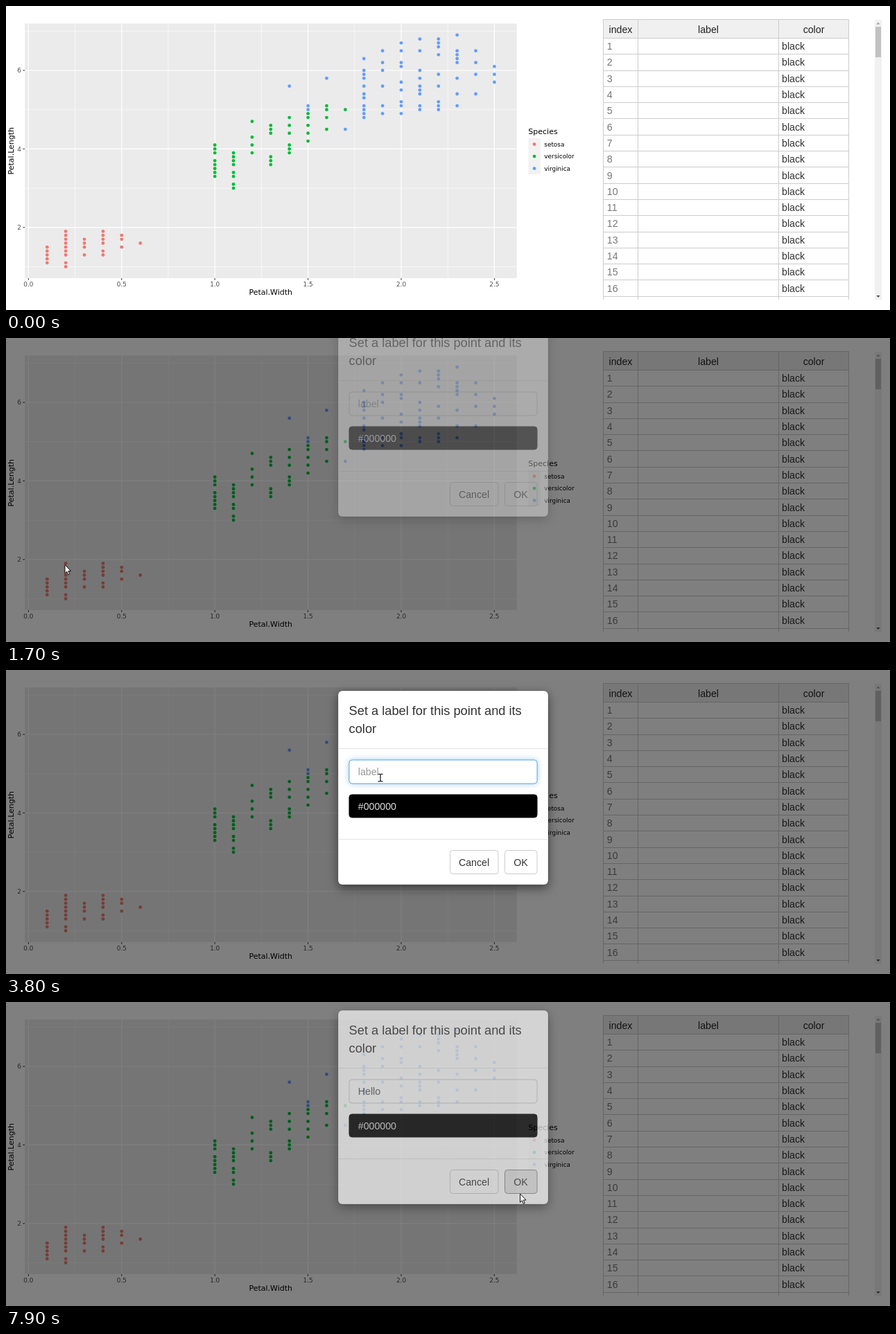
Write an HTML page that moves like this. It is 1275 px wide and 439 px high and loops after 8 s.

```html
<!DOCTYPE html>
<html lang="en">
<head>
<meta charset="utf-8">
<title>Label a point</title>
<style>
  html, body { margin: 0; width: 100%; height: 100%; overflow: hidden; background: #fff; }
  svg { display: block; width: 100%; height: 100%; font-family: "Liberation Sans", Arial, sans-serif; font-size: 14.18px; }
  text { white-space: pre; }
  .plot { font-family: "DejaVu Sans", Verdana, sans-serif; font-size: 8.9px; }
  .title { font-size: 11px; }
  .heading { font-size: 18.23px; }
  .sheet { filter: drop-shadow(0 5px 7.5px rgba(0,0,0,.5)); }
  .glow { filter: drop-shadow(0 0 4px rgba(102,175,233,.6)); }
</style>
</head>
<body>
<svg id="stage" viewBox="0 0 1275 439"></svg>
<script>
const LOOP = 8000, STEP = 100;

const ramp = (t, start, length) => Math.min(1, Math.max(0, (t - start) / length));
const easeOut = p => 1 - (1 - p) ** 1.6;
const mix = (a, b, p) => a + (b - a) * p;

// outline: [petal width, shortest, longest petal] in tenths; density: share of the inside that is filled
const species = [
  { name: "setosa", color: "#F8766D", density: .7,
    outline: [[1, 11, 15], [2, 10, 19], [3, 13, 17], [4, 13, 19], [6, 16, 16]] },
  { name: "versicolor", color: "#00BA38", density: .65,
    outline: [[10, 33, 41], [11, 30, 39], [12, 39, 47], [13, 36, 46], [16, 45, 51], [17, 50, 50]] },
  { name: "virginica", color: "#619CFF", density: .38,
    outline: [[14, 56, 56], [15, 50, 51], [16, 58, 58], [17, 45, 45], [18, 48, 63], [20, 49, 67], [23, 51, 69], [25, 57, 61]] }
];

let seed = 11;
const random = () => (seed = seed * 16807 % 2147483647) / 2147483647;

function cloud({ outline, density }) {
  const points = [];
  const column = (w, low, high) => {
    for (let l = low; l <= high; l++)
      if (l === low || l === high || random() < density) points.push([w / 10, l / 10]);
  };
  outline.forEach(([w, low, high], i) => {
    const [nextW, nextLow, nextHigh] = outline[i + 1] || [w + 1, low, high];
    for (let v = w; v < nextW; v++) {
      const p = (v - w) / (nextW - w);
      column(v, Math.round(mix(low, nextLow, p)), Math.round(mix(high, nextHigh, p)));
    }
  });
  return points;
}

const px = v => 32.4 + 268.8 * v;
const py = v => 433.2 - 56.7 * v;
const rect = (x, y, w, h, fill, more = "") =>
  `<rect x="${x}" y="${y}" width="${w}" height="${h}" fill="${fill}" ${more}/>`;
const line = (x1, y1, x2, y2, color, width = 1) =>
  `<path d="M${x1} ${y1}L${x2} ${y2}" stroke="${color}" stroke-width="${width}"/>`;
const text = (x, y, s, fill, more = "") => `<text x="${x}" y="${y}" fill="${fill}" ${more}>${s}</text>`;
const dot = (x, y, fill) => `<circle cx="${x}" cy="${y}" r="2.4" fill="${fill}"/>`;
const middle = 'text-anchor="middle"';

function plot() {
  const vertical = (v, w) => line(px(v), 25.3, px(v), 393, "#fff", w);
  const horizontal = (v, w) => line(27.2, py(v), 736.8, py(v), "#fff", w);
  let s = rect(27.2, 25.3, 709.6, 367.7, "#EBEBEB");
  for (let v = .25; v < 2.5; v += .5) s += vertical(v, .6);
  for (let v = 1; v < 8; v += 2) s += horizontal(v, .6);
  for (let v = 0; v <= 2.5; v += .5) {
    s += vertical(v, 1.2) + line(px(v), 393, px(v), 395.8, "#333") +
      text(px(v), 404.6, v.toFixed(1), "#4D4D4D", middle);
  }
  for (let v = 2; v < 8; v += 2) {
    s += horizontal(v, 1.2) + line(24.3, py(v), 27.2, py(v), "#333") +
      text(22, py(v) + 3.2, v, "#4D4D4D", 'text-anchor="end"');
  }
  s += text(381.7, 417, "Petal.Width", "#000", middle + ' class="title"') +
    text(0, 0, "Petal.Length", "#000", middle + ' class="title" transform="translate(11.4 209.2) rotate(-90)"') +
    text(753.3, 185, "Species", "#000", 'class="title"') +
    rect(753.4, 190.8, 17.4, 52.2, "#F2F2F2");
  species.forEach((kind, i) => {
    const y = 199.6 + 17.5 * i;
    s += dot(762, y, kind.color) + text(776.3, y + 3.2, kind.name, "#000");
    for (const [w, l] of cloud(kind)) s += dot(px(w), py(l), kind.color);
  });
  return `<g class="plot">${s}</g>`;
}

function table() {
  const edges = [861.5, 911.5, 1114.5, 1215.5], rule = "#ccc";
  let s = rect(861.5, 19.5, 354, 27, "#f0f0f0") + line(861.5, 19.5, 1215.5, 19.5, rule);
  ["index", "label", "color"].forEach((name, i) =>
    s += text((edges[i] + edges[i + 1]) / 2, 39, name, "#222", middle));
  for (let i = 0; i < 17; i++) {
    const y = 46.4 + 23.3 * i, top = Math.floor(y) + .5, base = Math.round(y + 16.7);
    s += line(861.5, top, 1215.5, top, rule);
    if (i < 16) s += text(866.8, base, i + 1, "#777") + text(1119, base, "black", "#333");
  }
  for (const x of edges) s += line(x, 19.5, x, 424, rule);
  return s + rect(1253, 20, 10, 404.5, "#f1f1f1") + rect(1254, 30, 8, 44, "#c1c1c1") +
    '<path d="M1255.3 26.5l2.7-3 2.7 3z" fill="#a3a3a3"/><path d="M1255.3 418l2.7 3 2.7-3z" fill="#505050"/>';
}

function modal() {
  const box = (x, y, w, h, fill, stroke, more = "") =>
    rect(x, y, w, h, fill, `rx="4" stroke="${stroke}" ${more}`);
  return rect(479, 30, 303, 280, "#fff", 'rx="6" class="sheet"') +
    rect(479, 30, 303, 280, "none", 'rx="6" stroke="#000" stroke-opacity=".2"') +
    text(494.6, 65, "Set a label for this point and its", "#333", 'class="heading"') +
    text(494.6, 91, "color", "#333", 'class="heading"') +
    line(479.5, 113.5, 781.5, 113.5, "#e5e5e5") + line(479.5, 244.5, 781.5, 244.5, "#e5e5e5") +
    box(495, 130, 271, 34, "#fff", "#ccc") +
    box(495, 130, 271, 34, "#fff", "#66afe9", 'id="focus" class="glow"') +
    text(507.8, 152, "", "#999", 'id="entry"') +
    rect(508, 139, 1, 16, "#333", 'id="caret"') +
    box(495, 180, 271, 33, "#000", "#000") + text(507.8, 202, "#000000", "#ddd") +
    box(640.5, 260.5, 69.5, 34, "#fff", "#ccc") + text(675, 283, "Cancel", "#333", middle) +
    box(719.5, 260.5, 46.5, 34, "#fff", "#ccc", 'id="ok"') + text(742.5, 283, "OK", "#333", middle);
}

const beam = "M-3.5 -5H-1L0 -4L1 -5H3.5M0 -4V4.5M-3.5 5.5H-1L0 4.5L1 5.5H3.5";
stage.innerHTML = plot() + table() +
  rect(0, 0, 1275, 439, "#000", 'id="shade"') +
  `<g id="dialog">${modal()}</g>
  <path id="arrow" d="M0 0V12.3L2.8 9.7L4.8 14.4L6.8 13.5L4.8 9H8.6Z" fill="#fff" stroke="#111"/>
  <g id="ibeam" fill="none"><path d="${beam}" stroke="#fff" stroke-width="2.6"/><path d="${beam}" stroke="#222" stroke-width="1.3"/></g>`;
const [shade, dialog, focusRing, entry, caret, ok, arrow, ibeam] =
  ["shade", "dialog", "focus", "entry", "caret", "ok", "arrow", "ibeam"].map(id => document.getElementById(id));

const APPEAR = 200, DIM = 1482, OPEN = 1649, FOCUS = 3200, PRESS = 7800, CLOSE = 7849;
const word = "Hello", keystrokes = [5000, 5500, 5800, 6000, 6200];
const moves = [
  { start: 200, end: 400, to: [70, 273] },
  { start: 600, end: 900, to: [85, 327.5] },
  { start: 2000, end: 2400, to: [495.5, 159] },
  { start: 2500, end: 2900, to: [540, 155.3] },
  { start: 6700, end: 7400, to: [741.5, 277] }
];

const pointer = t => moves.reduce((from, { start, end, to }) => {
  const p = easeOut(ramp(t, start, end - start));
  return from.map((v, i) => mix(v, to[i], p));
}, [75, 86]);

const set = (node, attributes) => {
  for (const name in attributes) node.setAttribute(name, attributes[name]);
};
const show = (node, on) => set(node, { visibility: on ? "visible" : "hidden" });

function draw(t) {
  const open = t > OPEN;
  const lift = 1 - easeOut(ramp(t, OPEN, 300)) + easeOut(ramp(t, CLOSE, 300));
  set(shade, { opacity: .5 * ramp(t, DIM, 150) });
  set(dialog, {
    opacity: ramp(t, OPEN, 150) - ramp(t, CLOSE, 150),
    transform: `translate(0 ${-Math.round(70 * lift)})`
  });
  show(dialog, open);

  const count = keystrokes.filter(k => k <= t).length;
  entry.textContent = count ? word.slice(0, count) : "label";
  set(entry, { fill: count ? "#555" : "#999" });
  set(focusRing, { opacity: ramp(t, FOCUS - 20, 150) - ramp(t, PRESS - 40, 140) });
  const blink = (t - (count ? keystrokes[count - 1] : FOCUS)) % 1200;
  set(caret, { x: Math.floor(508 + (count ? entry.getComputedTextLength() : 0)) });
  show(caret, t >= FOCUS && t < PRESS && blink < 600);

  const [x, y] = pointer(t);
  const hover = x > 719 && y > 260 && y < 295;
  set(ok, {
    fill: hover ? "#e6e6e6" : "#fff",
    stroke: t >= PRESS ? "#8c8c8c" : hover ? "#adadad" : "#ccc"
  });
  const overField = open && x > 496 && x < 766 && (y > 130 && y < 164 || y > 180 && y < 213);
  for (const node of [arrow, ibeam]) set(node, { transform: `translate(${x} ${y})` });
  show(arrow, t >= APPEAR && !overField);
  show(ibeam, overField);
}

function tick() {
  // the picture advances in tenths of a second
  draw(Math.floor(performance.now() % LOOP / STEP) * STEP);
  requestAnimationFrame(tick);
}
tick();
</script>
</body>
</html>
```
